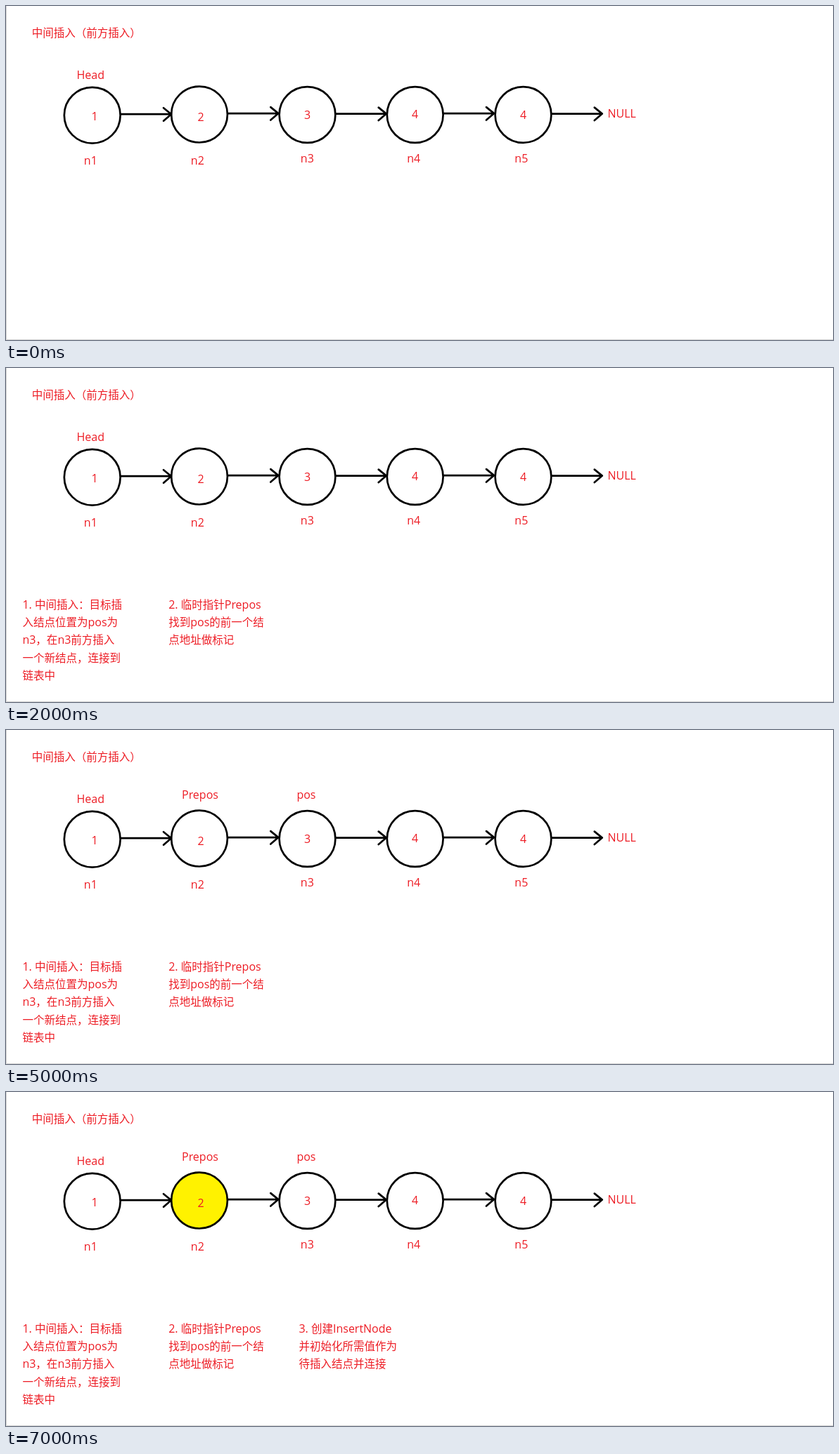
Animation, 1176 px wide and 476 px high, one loop 8 s. Source, as an HTML page:

```html
<!DOCTYPE html>
<html lang="zh-CN">
<head>
<meta charset="utf-8">
<title>链表中间插入</title>
<style>
  html, body { margin: 0; width: 100%; height: 100%; overflow: hidden; background: #fff; }
  svg { display: block; width: 1176px; height: 476px; }
  text { font: 15.5px "Noto Sans CJK SC", "Noto Sans CJK", sans-serif; fill: #ed1c24; white-space: pre; }
  .latin { font: 16px "Open Sans", "Noto Sans", sans-serif; }
  .ink { fill: none; stroke: #000; stroke-width: 2.7; stroke-linecap: round; stroke-linejoin: round; }
</style>
</head>
<body>
<svg id="stage" viewBox="0 0 1176 476"></svg>
<script>
const LOOP = 8000;
const LINE_HEIGHT = 25.4;
const stage = document.getElementById('stage');

function add(tag, attrs, parent = stage) {
  const el = document.createElementNS('http://www.w3.org/2000/svg', tag);
  for (const key in attrs) el.setAttribute(key, attrs[key]);
  parent.append(el);
  return el;
}

// Latin runs get their own font, Chinese runs keep the default one.
function label(str, x, y, anchor = 'start', parent = stage) {
  const el = add('text', { x, y, 'text-anchor': anchor }, parent);
  for (const run of str.match(/[ -~]+|[^ -~]+/g)) {
    const span = add('tspan', /[ -~]/.test(run) ? { class: 'latin' } : {}, el);
    span.textContent = run;
  }
  return el;
}

function step(x, lines) {
  const group = add('g', {});
  lines.forEach((line, i) => label(line, x, 342.6 + i * LINE_HEIGHT, 'start', group));
  return group;
}

function arrow(x, y, length) {
  const tip = x + length;
  add('path', {
    class: 'ink',
    d: `M${x} ${y}H${tip}M${tip - 11} ${y - 9}L${tip} ${y}L${tip - 11} ${y + 9.5}`
  });
}

const nodes = [
  { x: 122.7, y: 155.7, value: 1, valueX: 126, valueY: 163.2, nameX: 120.3, nameY: 226 },
  { x: 275, y: 154.6, value: 2, valueX: 277, valueY: 163.5, nameX: 272.3, nameY: 225.5 },
  { x: 428.5, y: 155, value: 3, valueX: 428.5, valueY: 160.5, nameX: 428.3, nameY: 223 },
  { x: 581.7, y: 155, value: 4, valueX: 581.7, valueY: 160.2, nameX: 579.7, nameY: 223 },
  { x: 735.5, y: 155, value: 4, valueX: 735.5, valueY: 160.5, nameX: 732.8, nameY: 223 }
];

add('path', { d: 'M.5 0V475.5H1176', fill: 'none', stroke: '#d4d4d4' });
label('中间插入（前方插入）', 36.8, 43.5);
label('Head', 100.5, 104);
label('NULL', 855.5, 159);

nodes.forEach((node, i) => {
  node.circle = add('circle', { class: 'ink', cx: node.x, cy: node.y, r: 39.9 });
  label(String(node.value), node.valueX, node.valueY, 'middle');
  label('n' + (i + 1), node.nameX, node.nameY, 'middle');
  arrow(node.x + 40.5, i % 2 ? 153.1 : i ? 153.6 : 154.2, 71.8);
});

const pos = label('pos', 413.4, 98);
const prepos = label('Prepos', 98.4, 75);

const steps = [
  step(23.4, ['1. 中间插入：目标插', '入结点位置为pos为', 'n3，在n3前方插入', '一个新结点，连接到', '链表中']),
  step(231.2, ['2. 临时指针Prepos', '找到pos的前一个结', '点地址做标记']),
  step(416.4, ['3. 创建InsertNode', '并初始化所需值作为', '待插入结点并连接'])
];
const stepStarts = [1000, 2000, 7000];

function show(el, on) {
  el.setAttribute('visibility', on ? 'visible' : 'hidden');
}

function draw(t) {
  steps.forEach((el, i) => show(el, t >= stepStarts[i]));
  show(pos, t >= 3000);
  show(prepos, t >= 4000);
  const moved = t >= 5000;
  prepos.setAttribute('x', moved ? 250 : 98.4);
  prepos.setAttribute('y', moved ? 98 : 75);
  nodes[1].circle.style.fill = t >= 6000 ? '#fff200' : 'none';
}

const start = performance.now();
function tick() {
  draw((performance.now() - start) % LOOP);
  requestAnimationFrame(tick);
}
tick();
</script>
</body>
</html>
```
